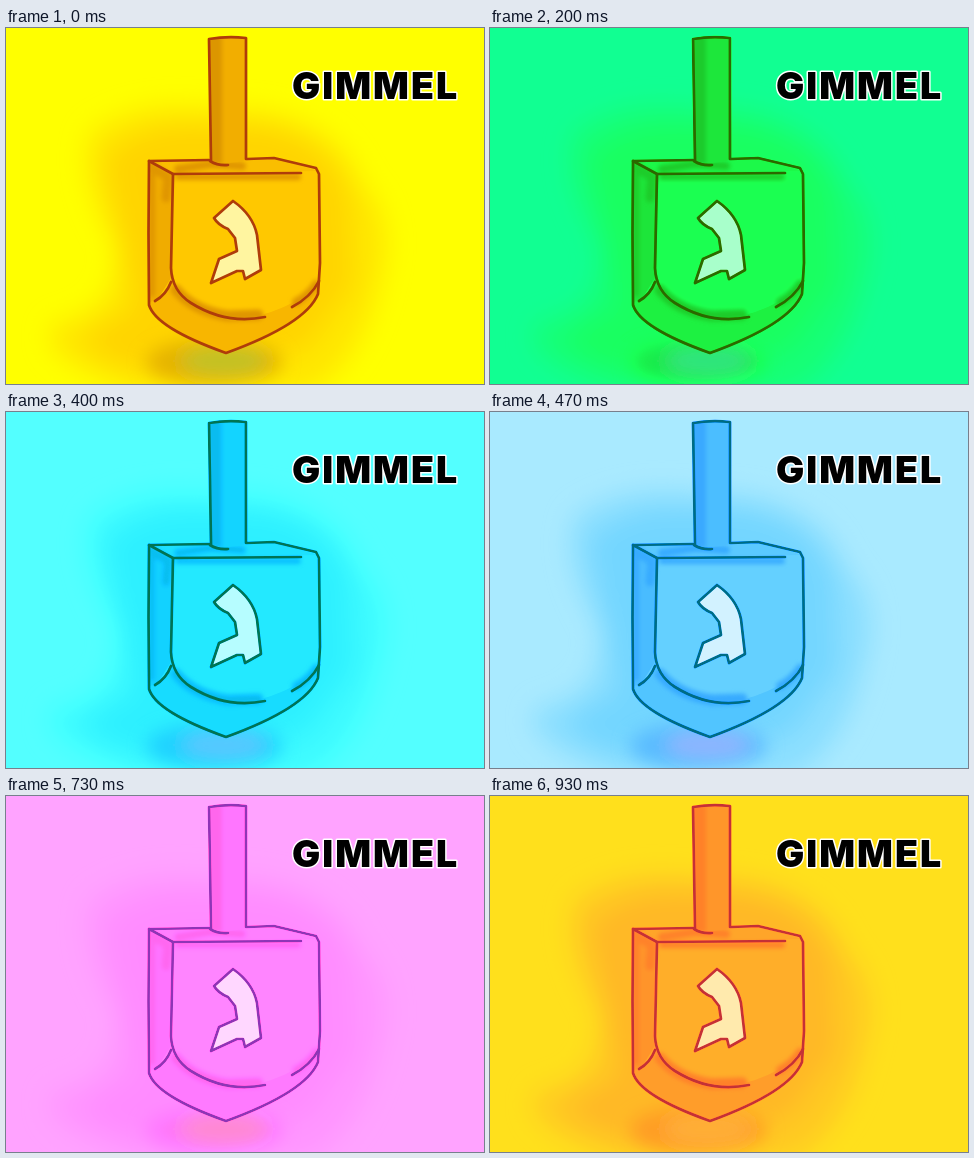
An HTML page for the animation above (990 ms loop, 478 by 356 pixels).

```html
<!DOCTYPE html>
<html lang="en">
<head>
<meta charset="utf-8">
<title>Gimmel</title>
<style>
html, body { margin: 0; width: 100%; height: 100%; overflow: hidden; background: #fff; }
svg { position: absolute; left: 0; top: 0; width: 478px; height: 356px; }
.scene { animation: hue 990ms step-end infinite; }
.line { fill: none; stroke: #af3c0a; stroke-width: 2.7; stroke-linecap: round; stroke-linejoin: round; }
.label {
  font: 900 37.5px Inter, "Open Sans", sans-serif; letter-spacing: 2px;
  fill: #000; stroke: #fff; stroke-width: 3px; stroke-linejoin: round; paint-order: stroke;
}
/* 24 degrees per step, fifteen steps per loop */
@keyframes hue {
  0% { filter: hue-rotate(0deg); }
  7.05% { filter: hue-rotate(24deg); }
  13.1% { filter: hue-rotate(48deg); }
  20.2% { filter: hue-rotate(72deg); }
  27.25% { filter: hue-rotate(96deg); }
  33.3% { filter: hue-rotate(120deg); }
  40.4% { filter: hue-rotate(144deg); }
  47.45% { filter: hue-rotate(168deg); }
  53.5% { filter: hue-rotate(192deg); }
  60.6% { filter: hue-rotate(216deg); }
  67.65% { filter: hue-rotate(240deg); }
  73.7% { filter: hue-rotate(264deg); }
  80.8% { filter: hue-rotate(288deg); }
  87.85% { filter: hue-rotate(312deg); }
  93.9%, 100% { filter: hue-rotate(336deg); }
}
</style>
</head>
<body>
<svg class="scene" viewBox="0 0 478 356">
  <defs>
    <filter id="glow" x="-50%" y="-50%" width="200%" height="200%"><feGaussianBlur stdDeviation="13"/></filter>
    <filter id="soft" x="-50%" y="-50%" width="200%" height="200%"><feGaussianBlur stdDeviation="2"/></filter>
    <filter id="haze" x="-50%" y="-100%" width="200%" height="300%"><feGaussianBlur stdDeviation="9"/></filter>
    <clipPath id="body"><path d="M143 133L205 132L268 130L310 140L313 146L314 235L312 266Q300 293 220 325Q150 300 143 277Z"/></clipPath>
    <clipPath id="stem"><path d="M203 11Q221 8 240 10L240 132Q222 138 205 133Z"/></clipPath>
  </defs>
  <rect width="478" height="356" fill="#ff0"/>

  <g filter="url(#glow)">
    <path fill="#ffe600" d="M85 105Q130 72 195 80L250 82Q335 95 355 155Q392 190 375 250Q355 340 300 365L130 365Q20 325 50 295Q115 285 110 215Q70 150 85 105Z"/>
    <path fill="#ffd400" d="M100 130Q140 92 200 98L250 98Q322 108 342 165L346 255L300 320L180 350Q75 335 82 305L128 280Z"/>
  </g>
  <g filter="url(#haze)">
    <ellipse cx="208" cy="334" rx="68" ry="23" fill="#e6b400"/>
    <ellipse cx="218" cy="333" rx="44" ry="14" fill="#b4c832" opacity=".75"/>
  </g>

  <g clip-path="url(#body)">
    <rect x="140" y="125" width="180" height="205" fill="#ffc800"/>
    <path fill="#f0ac00" d="M140 130L167 146L165 250L150 274L140 280Z"/>
    <path fill="#fabe00" d="M143 133L268 130L312 143L167 146Z"/>
    <path fill="#f8b600" d="M142 275Q160 268 165 250Q174 283 225 293Q285 285 314 254V330H140Z"/>
    <g filter="url(#soft)" fill="none" stroke="#e09600" stroke-linecap="round">
      <path stroke-width="9" d="M145 139L162 149L160 170"/>
      <path stroke-width="8" d="M172 141L205 136L236 138"/>
      <path stroke-width="6" d="M172 149L292 149"/>
      <path stroke-width="11" d="M170 262Q188 283 222 288L252 287"/>
      <path stroke-width="8" d="M290 274Q304 266 310 256"/>
      <path stroke-width="6" d="M146 145V266"/>
    </g>
  </g>

  <g clip-path="url(#stem)">
    <rect x="200" y="5" width="44" height="132" fill="#f2ae00"/>
    <path fill="#dc9600" d="M202 5H216V136H202Z" filter="url(#soft)"/>
  </g>

  <g class="line">
    <path d="M205 133L203 11Q221 8 240 10L240 131M204 133Q212 138 222 137"/>
    <path d="M203 132L143 133L142.500 205L143 277Q150 300 220 325Q300 296 312 266L314 235L313 146L310 140L268 130L241 131"/>
    <path d="M143 133L167 146L295 145"/>
    <path d="M167 146L165 240Q166 263 185 275Q220 297 259 289"/>
    <path d="M149 273Q160 267 165 254M286 279Q305 269 313 253"/>
  </g>
  <path class="line" style="fill:#fff5a0" d="M208 190L227 173Q247 187 251 207L255 242L239 251L237 243L231 243L205 255L213 231L231 223L229 210L222 201Q212 197 208 190Z"/>
</svg>
<svg viewBox="0 0 478 356"><text class="label" x="286" y="71">GIMMEL</text></svg>
</body>
</html>
```
